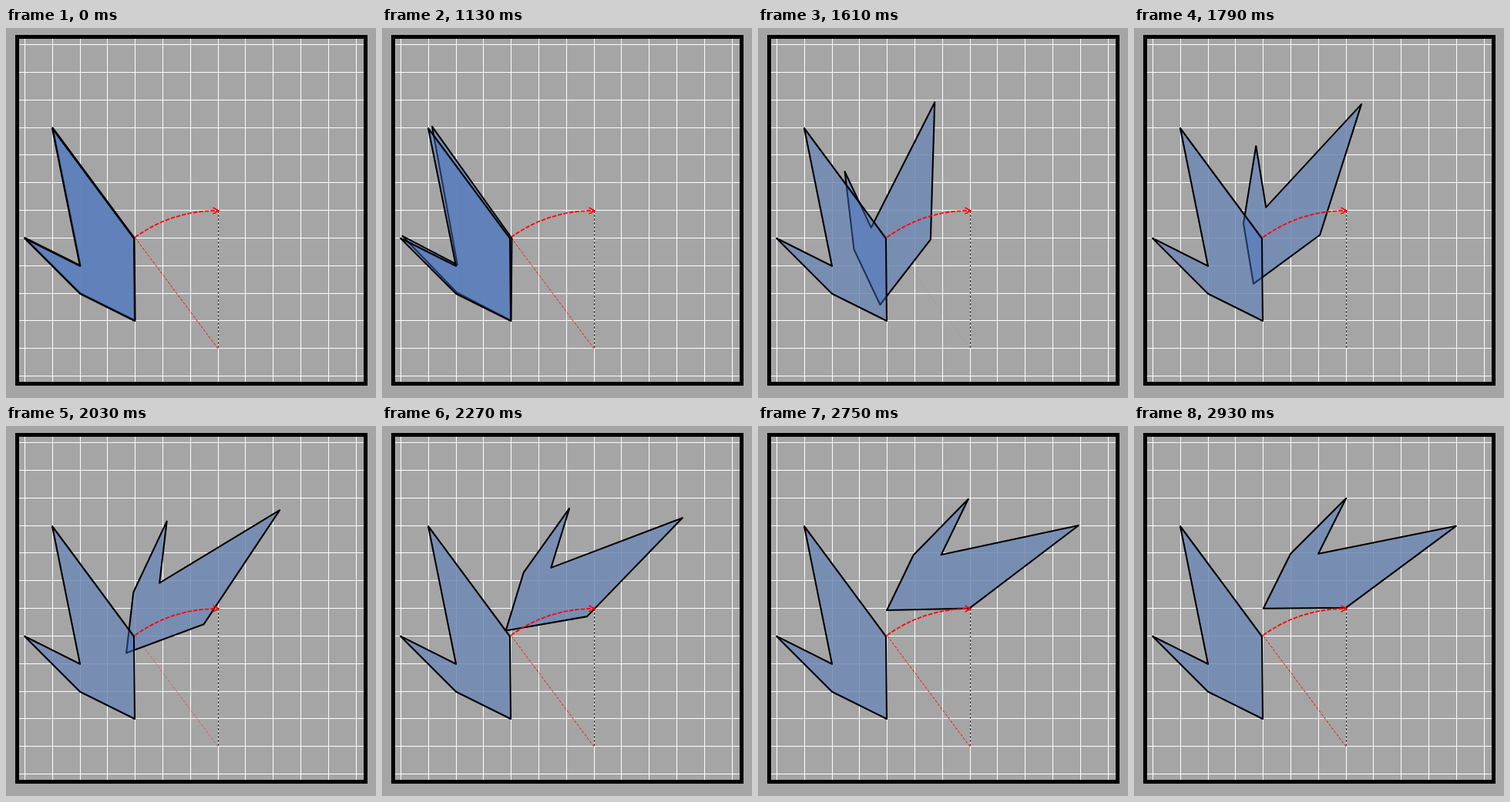
An HTML page for the animation above (4.13 s loop, 480x480 px).

```html
<!DOCTYPE html>
<html lang="en">
<head>
<meta charset="utf-8">
<title>Rotation about a point</title>
<style>
  html, body { margin: 0; width: 100%; height: 100%; overflow: hidden; background: #a5a5a5; }
  svg { display: block; width: 100%; height: 100%; }
  .mask { fill: #a5a5a5; fill-opacity: .75; }
  .shape { fill: #4472c4; fill-opacity: .45; stroke: #000; stroke-width: 2.1; stroke-linejoin: round; }
  .red { fill: none; stroke: #f00; }
</style>
</head>
<body>
<svg viewBox="0 0 480 480">
  <defs>
    <!-- drawn around the middle of its bounding box -->
    <path id="bird" d="M-35.5-125L70.5 18L71.5 125L.5 89.7L-71.5 17.7L.5 53.7Z"/>
  </defs>
  <path id="grid" stroke="#fff" shape-rendering="crispEdges"/>
  <rect x="14.5" y="11.5" width="452" height="450" fill="none" stroke="#000" stroke-width="5"/>

  <use href="#bird" class="mask" x="95.5" y="255"/>
  <use href="#bird" class="mask moving"/>
  <path id="radius" class="red" d="M167.5 272L275 416" stroke-dasharray="3.5 2"/>
  <path d="M275.5 237V416" stroke="#333" stroke-dasharray="3 2"/>

  <use href="#bird" class="shape moving"/>
  <use href="#bird" class="shape" x="95.5" y="255"/>
  <path class="red" d="M167.5 271.5A180 180 0 0 1 275 237" stroke-width="1.8" stroke-dasharray="5.5 2"/>
  <path class="red" d="M268.5 233L276 237L268.5 241" stroke-width="1.6"/>
</svg>
<script>
  const LOOP = 4130, START = 1130, STEP = 60, LAST = 31;
  const FROM = [96, 254.5], TO = [292.8, 165.3];
  // [step, progress]
  const EASE = [[0, 0], [1, .0115], [6, .246], [12, .602], [16, .78], [24, .966], [31, 1]];
  const FADE = [[0, 1], [10, 0], [12, 0], [21, 1], [31, 1]];

  const mix = (a, b, k) => a + (b - a) * k;
  const segment = (points, x) => Math.max(0, points.findIndex(p => p[0] >= x) - 1);
  const slope = (points, i) =>
    (points[i + 1][1] - points[i][1]) / (points[i + 1][0] - points[i][0]);

  function linear(points, x) {
    const i = segment(points, x);
    return points[i][1] + slope(points, i) * (x - points[i][0]);
  }

  function tangent(points, i) {
    if (i === 0 || i === points.length - 1) return 0;
    const a = slope(points, i - 1), b = slope(points, i);
    return 2 * a * b / (a + b);
  }

  // Monotone cubic through the points
  function smooth(points, x) {
    const i = segment(points, x);
    const [x0, y0] = points[i], [x1, y1] = points[i + 1];
    const h = x1 - x0, k = (x - x0) / h, r = 1 - k;
    return y0 * r * r * (1 + 2 * k) + y1 * k * k * (3 - 2 * k)
      + h * k * r * (tangent(points, i) * r - tangent(points, i + 1) * k);
  }

  let lines = '';
  for (let k = 0; k < 13; k++) {
    const x = Math.floor(24.6 + 35.79 * k) + .5;
    const y = Math.floor(21.65 + 35.83 * k) + .5;
    lines += `M${x} 14V459M17 ${y}H464`;
  }
  document.getElementById('grid').setAttribute('d', lines);

  const moving = document.querySelectorAll('.moving');
  const radius = document.getElementById('radius');

  function draw(now) {
    const t = now % LOOP;
    const step = t < START ? 0 : Math.min(LAST, 1 + Math.floor((t - START) / STEP));
    const p = smooth(EASE, step);
    const pose = `translate(${mix(FROM[0], TO[0], p)} ${mix(FROM[1], TO[1], p)}) rotate(${90 * p})`;
    moving.forEach(el => el.setAttribute('transform', pose));
    radius.setAttribute('opacity', linear(FADE, step));
  }

  const begin = performance.now();
  function tick() {
    draw(performance.now() - begin);
    requestAnimationFrame(tick);
  }
  tick();
</script>
</body>
</html>
```
